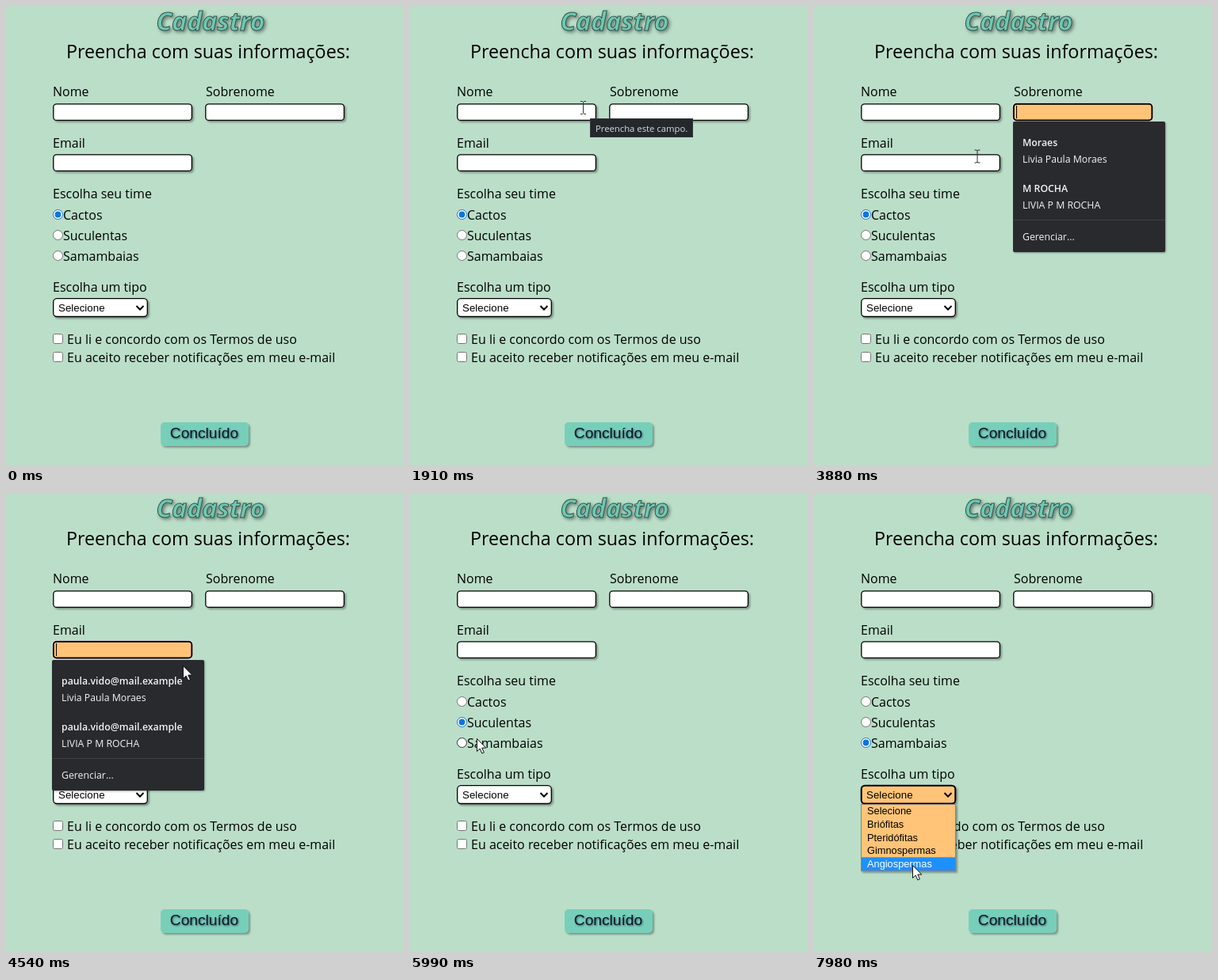
Write an HTML page that moves like this. It is 502 by 580 pixels and loops after 8 s.

```html
<!DOCTYPE html>
<html lang="pt-BR">
<head>
<meta charset="utf-8">
<title>Cadastro</title>
<style>
  html, body { margin: 0; width: 100%; height: 100%; overflow: hidden; background: #bbdec8; }
  svg { display: block; width: 502px; height: 580px; font: 16px "Open Sans", "Noto Sans", sans-serif; }
  .title { font-size: 32.2px; font-weight: 700; font-style: italic; fill: #6fc9b2; stroke: #30544e; stroke-width: 1px;
    filter: drop-shadow(2px 2px 2px #0007); }
  .sub { font-size: 23.3px; }
  .mid { text-anchor: middle; }
  .ui { font-family: "Liberation Sans", Arial, sans-serif; font-size: 13.33px; }
  .shade { filter: drop-shadow(2px 2px 1px #0005); }
  .box { fill: #fff; stroke: #000; stroke-width: 1.3; }
  .ring { fill: #fff; }
  .focus .box { fill: #ffc477; stroke-width: 2; }
  .field:not(.focus) .ring { display: none; }
  .focus.field { filter: none; }
  .tick { fill: #fff; stroke: #767676; }
  .dot { fill: none; }
  .hover .tick { stroke: #333; }
  .on .tick { stroke: #0f75dc; }
  .on .dot { fill: #0f75dc; }
  .button { font-size: 19.2px; fill: #0c1530; filter: drop-shadow(1px 1px 1px #0008); }
  .menu { font-size: 12.3px; fill: #f1f3f4; filter: drop-shadow(1px 1px 1px #0005); }
  .menu .strong { font-weight: 600; }
  .tip { font-size: 11.3px; fill: #d9dbde; }
  .list { font-size: 12.8px; }
  .pick .row { fill: #1e90ff; }
  .row { fill: none; }
  .pick text { fill: #fff; }
</style>
</head>
<body>
<svg id="stage" viewBox="0 0 502 580"></svg>
<script>
const fields = [[59, 123], [251, 123], [59, 187]];
const radios = [['Cactos', 264], ['Suculentas', 290], ['Samambaias', 316]];
const checks = [['Eu li e concordo com os Termos de uso', 421, 362],
                ['Eu aceito receber notificações em meu e-mail', 444, 415]];
const options = ['Selecione', 'Briófitas', 'Pteridófitas', 'Gimnospermas', 'Angiospermas'];
const rowH = 16.7, listY = 393.5;

const text = (x, y, s, cls = '') => `<text x="${x}" y="${y}" class="${cls}">${s}</text>`;
const rect = (x, y, w, h, r, attrs) => `<rect x="${x}" y="${y}" width="${w}" height="${h}" rx="${r}" ${attrs}/>`;

const field = ([x, y]) => `<g class="field shade">
  ${rect(x - 1, y - 1, 178, 24, 6, 'class="ring"')}
  ${rect(x + .8, y + .8, 174.6, 20.6, 4, 'class="box"')}
  <path class="caret" d="M${x + 4.5} ${y + 3}v16" stroke="#000"/></g>`;

const radio = ([label, y]) => `<g class="radio">
  <circle class="tick" cx="65.5" cy="${y - .5}" r="6"/>
  <circle class="dot" cx="65.5" cy="${y - .5}" r="3.9"/>${text(72, y + 6, label)}</g>`;

const check = ([label, y]) => `<g class="check">
  ${rect(59.5, y - 6.5, 12, 12, 2, 'class="tick"')}${text(77, y + 6, label)}</g>`;

const menu = (x, y, w, lines) => `<g class="menu" transform="translate(${x} ${y})">
  ${rect(0, 0, w, 165, 2, 'fill="#292a2d"')}
  <path d="M0 124.5h${w}" stroke="#3f4145"/>
  ${lines.map((s, i) => text(12, [31, 52, 89, 110][i], s, i % 2 ? '' : 'strong')).join('')}
  ${text(12, 150, 'Gerenciar...')}</g>`;

const option = (s, i) => `<g class="option">
  ${rect(60, listY + i * rowH, 118, rowH, 0, 'class="row"')}
  ${text(67, listY + i * rowH + 12.6, s)}</g>`;

const full = 'Livia Paula Moraes', caps = 'LIVIA P M ROCHA', mail = 'paula.vido@mail.example';
const stage = document.getElementById('stage');
stage.innerHTML = `
  ${text(258, 31, 'Cadastro', 'title mid')}
  ${text(255, 66, 'Preencha com suas informações:', 'sub mid')}
  ${text(59, 114, 'Nome')}${text(252, 114, 'Sobrenome')}${text(59, 179, 'Email')}
  ${fields.map(field).join('')}
  ${text(59, 243, 'Escolha seu time')}${radios.map(radio).join('')}
  ${text(59, 361, 'Escolha um tipo')}
  <g id="select" class="ui shade">
    ${rect(59.7, 369.7, 118.6, 22.8, 4.5, 'class="box"')}${text(66, 385.7, 'Selecione')}
    <path d="M164.5 379l4.5 4.5 4.5-4.5" fill="none" stroke="#000" stroke-width="2"/>
  </g>
  ${checks.map(check).join('')}
  <g class="ui">${rect(195, 526, 111, 30, 5, 'fill="#77cfba" class="shade"')}
    ${text(250, 546, 'Concluído', 'button mid')}</g>
  <g id="list" class="ui list">
    ${rect(59.5, 393.5, 119, 84, 0, 'fill="#ffc477" stroke="#8a8378" class="shade"')}
    ${options.map(option).join('')}
  </g>
  ${menu(59, 146, 190, ['Livia', full, 'LIVIA', caps])}
  ${menu(251, 146, 192, ['Moraes', full, 'M ROCHA', caps])}
  ${menu(58, 211, 192, [mail, full, mail, caps])}
  <g id="tip" class="tip">${rect(227.5, 142.5, 129, 23, 0, 'fill="#24272b" stroke="#34383c"')}
    ${text(234, 159, 'Preencha este campo.')}</g>
  <g id="pointer">
    <circle id="halo" cx="-1" r="11.5" fill="#f4dc3c"/>
    <path id="beam" d="M-3.5-8h2.5l1 1 1-1h2.5M0-7V7M-3.5 8h2.5l1-1 1 1h2.5" fill="none" stroke="#333"/>
    <path id="arrow" d="M.5.5v16l3.7-3.4 2.6 5.9 2.6-1.1-2.6-5.8h5z" fill="#fff" stroke="#111"/>
  </g>`;

const $ = id => document.getElementById(id);
const all = cls => [...stage.querySelectorAll('.' + cls)];
const fieldEls = all('field'), carets = all('caret'), radioEls = all('radio'),
      checkEls = all('check'), menus = all('menu'), optionEls = all('option');

// Pointer path: time, x, y
const path = [
  [430, 452, 559], [1180, 225, 124], [1250, 222, 126], [1380, 218.5, 128.5],
  [2430, 218.5, 128.5], [2640, 293, 128], [3040, 293, 128], [3810, 206, 186],
  [3880, 206, 190], [4330, 206, 190], [4540, 223, 218], [4660, 228, 260],
  [4790, 312, 236], [5090, 312, 236], [5460, 90, 288], [5780, 90, 288],
  [5990, 84, 310], [6060, 83, 317], [6260, 83, 317], [6370, 88, 335],
  [6660, 116, 379], [7130, 116, 379], [7910, 124, 465], [7980, 124, 470]
];
const clicks = [[2240, 2430], [2650, 2990], [4080, 4320], [4790, 5080], [5600, 5790], [6110, 6290], [6820, 6890]];
const focusTimes = [[2300, 2660], [2660, 4150], [4150, 4820]];
// Menu fades: start in, end in, start out, end out
const menuTimes = [[2300, 2400, 2660, 2960], [2660, 2700, 4150, 4330], [4150, 4200, 4880, 5080]];

const clamp = v => Math.max(0, Math.min(1, v));
const within = (t, [a, b]) => t >= a && t < b;
const fade = (t, [a, b, c, d]) => clamp((t - a) / (b - a)) * clamp((d - t) / (d - c));
const show = (el, alpha) => {
  el.style.display = alpha > 0 ? '' : 'none';
  el.style.opacity = alpha;
};

function pointerAt(t) {
  const i = path.findIndex(p => p[0] > t);
  if (i < 0) return path.at(-1).slice(1);
  if (i === 0) return path[0].slice(1);
  const [t0, x0, y0] = path[i - 1], [t1, x1, y1] = path[i];
  let k = (t - t0) / (t1 - t0);
  k = k * k * (3 - 2 * k);
  return [x0 + (x1 - x0) * k, y0 + (y1 - y0) * k];
}

function render(t) {
  const [x, y] = pointerAt(t);
  fieldEls.forEach((el, i) => {
    const on = within(t, focusTimes[i]);
    el.classList.toggle('focus', on);
    show(carets[i], on && (t - focusTimes[i][0]) % 1000 < 500 ? 1 : 0);
    show(menus[i], fade(t, menuTimes[i]));
  });

  const chosen = t < 5670 ? 0 : t < 6180 ? 1 : 2;
  radioEls.forEach((el, i) => {
    el.classList.toggle('on', i === chosen);
    el.classList.toggle('hover', x > 59 && x < 165 && Math.abs(y - radios[i][1]) < 12);
  });
  checkEls.forEach((el, i) =>
    el.classList.toggle('hover', t > 430 && t < 1180 && x < checks[i][2] && Math.abs(y - checks[i][1]) < 11));

  const open = t >= 6820;
  $('select').classList.toggle('focus', open);
  show($('list'), open ? 1 : 0);
  const row = Math.max(0, Math.min(4, Math.floor((y - listY) / rowH)));
  optionEls.forEach((el, i) => el.classList.toggle('pick', i === row));

  show($('tip'), t < 1910 ? 0 : fade(t, [1700, 1910, 2240, 2310]));

  const beam = fields.some(([fx, fy]) => x > fx && x < fx + 176 && y > fy && y < fy + 22);
  const click = clicks.find(c => within(t, c));
  show($('pointer'), t >= 430 ? 1 : 0);
  $('pointer').setAttribute('transform', `translate(${x} ${y})`);
  show($('beam'), beam ? 1 : 0);
  show($('arrow'), beam ? 0 : 1);
  show($('halo'), click ? .75 * clamp((click[1] - t) / 110) : 0);
}

const start = performance.now();
function tick(now) {
  render(Math.max(0, now - start) % 8000);
  requestAnimationFrame(tick);
}
render(0);
requestAnimationFrame(tick);
</script>
</body>
</html>
```
